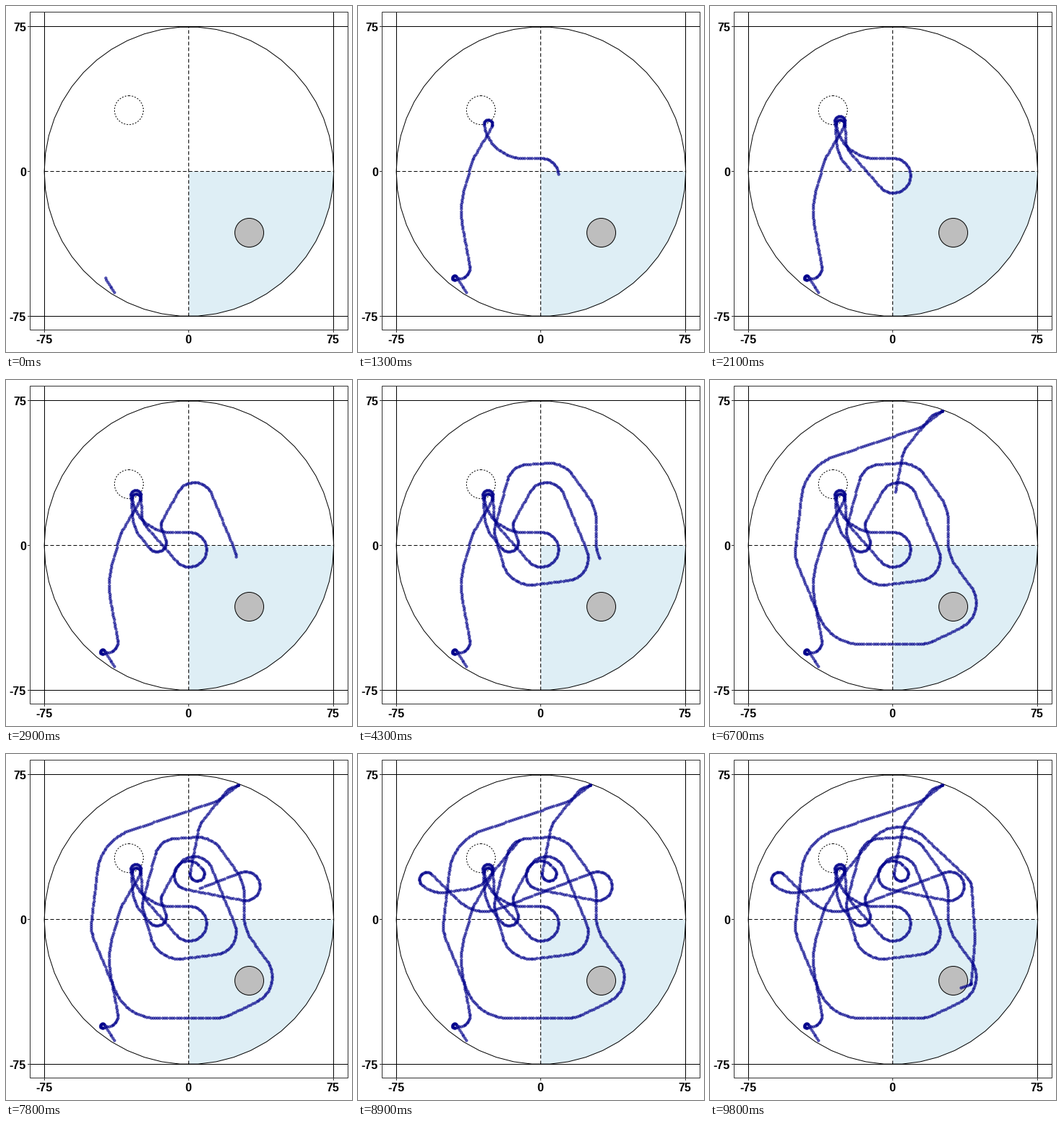
Recreate the animation shown at these times as a matplotlib script. Size 480 px wide and 480 px high, loop 10000 ms.

```python
import numpy as np
import matplotlib.pyplot as plt
from matplotlib.animation import FuncAnimation
from matplotlib.patches import Circle, Polygon, Rectangle

SIZE, DPI = 480, 100
FRAMES, INTERVAL = 100, 100
LAST = 98          # the finished track is held for one more frame
RATE = 12          # tracked positions per frame
LEAD = 8           # positions already drawn at the start
TURN_COST = 8      # a turn of one radian takes as long as this many pixels
PX = 72 / DPI      # one pixel in points
CX, CY, R = 253.4, 229.2, 200.8
INK, NAVY = "#333333", "#00008b"

plt.rcParams["font.family"] = "Liberation Sans"
fig = plt.figure(figsize=(SIZE / DPI, SIZE / DPI), dpi=DPI, facecolor="white")
ax = fig.add_axes([0, 0, 1, 1])
ax.set(xlim=(-.5, SIZE - .5), ylim=(SIZE - .5, -.5))  # whole numbers are pixel centres
ax.axis("off")


def line(x, y, color="black", dashed=False):
    ax.plot(x, y, color=color, lw=PX, snap=False, zorder=3,
            solid_capstyle="butt", dash_capstyle="butt",
            ls=(0, (5, 3)) if dashed else "-")


def disc(x, y, fill, style="-"):
    ax.add_patch(Circle((x, y), 20, fc=fill, ec="black", lw=PX, ls=style,
                        capstyle="butt", zorder=3))


def label(x, y, text, ha):
    ax.text(x, y, text, ha=ha, va="baseline", fontsize=16 * PX, weight="bold")


def arc(a, b, n):
    t = np.linspace(a, b, n)
    return np.column_stack([CX + R * np.cos(t), CY + R * np.sin(t)])


def draw_pool():
    quarter = np.vstack([[CX, CY], arc(0, np.pi / 2, 26)])
    ax.add_patch(Polygon(quarter, fc="#deeef5", ec="none", zorder=1))
    line(*arc(0, 2 * np.pi, 51).T)
    left, mid_x, right = (round(CX + k * R) for k in (-1, 0, 1))
    top, mid_y, bottom = (round(CY + k * R) for k in (-1, 0, 1))
    for x in (left, right):
        line([x, x], [8, 449])
    for y in (top, bottom):
        line([33, 474], [y, y])
    line([mid_x, mid_x], [bottom, top], dashed=True)
    line([left, right], [mid_y, mid_y], dashed=True)
    disc(170, 144, "none", (0, (2, 2)))
    disc(337, 314, "#bebebe")
    ax.add_patch(Rectangle((33, 8), 441, 441, fill=False, ec=INK, lw=PX,
                           snap=False, zorder=4))
    for value, x, y in ((-75, left, bottom), (0, mid_x, mid_y), (75, right, top)):
        line([x, x], [449.5, 452.5], INK)
        line([29.5, 32.5], [y, y], INK)
        label(x - 1, 467.5, str(value), "center")
        label(27.3, y + 6.5, str(value), "right")


# The swimmer rounds these circles one after another: x, y, radius
# (positive clockwise, negative anticlockwise, zero for a corner).
TURNS = [
    # release at the rim, up to the dotted ring
    (150, 397, 0), (134, 377, -3), (140, 363, -15), (263, 285, 120),
    (172, 218, 14), (180.5, 164, -6), (229, 156, -55),
    # back to the ring
    (254, 235, 24), (218, 185, 30), (180, 160, -7), (228, 185, -53), (209, 225, -13),
    # widening circles
    (233, 202, 18), (261, 168, 26), (288, 247, 31), (240, 243, 41), (218, 209, 29),
    (235, 146, 29), (265, 155, 40), (275, 195, 55), (385, 225, -55), (331, 309, 38),
    (290, 316, 50), (207, 306, 60), (170, 238, 52), (194, 170, 68),
    # touch the rim, small loops
    (270, 20, -50), (322, 43, 0), (320, 64, -19), (300, 112, -34), (265, 166, -10),
    (253, 168, -20), (332, 183, -20), (176, 165, 53), (95, 174, -10), (115, 157, -35),
    # round to the platform
    (150, 150, -37), (262, 151, 50), (338, 188, 25), (267, 255, 100),
    (359, 317, 3), (348, 324, 0),
]


def heading(a, b):
    """Direction of the line that leaves circle a and meets circle b."""
    d = complex(b[0] - a[0], b[1] - a[1])
    return np.angle(d) - np.arcsin((b[2] - a[2]) / abs(d))


def turn_angle(start, end, r):
    turn = (end - start + np.pi) % (2 * np.pi) - np.pi
    if turn * r < 0 and abs(turn) > .2:
        turn += 2 * np.pi * np.sign(r)
    return turn


def trace(turns):
    """Points along the arcs and their joining lines, with elapsed effort."""
    ways = [heading(a, b) for a, b in zip(turns, turns[1:])]
    points, effort = [], []
    spent = 0
    for (x, y, r), way, out in zip(turns, ways[:1] + ways, ways + ways[-1:]):
        turn = turn_angle(way, out, r)
        u = np.linspace(0, 1, 40)
        p = complex(x, y) - 1j * r * np.exp(1j * (way + turn * u))
        if points:
            spent += abs(p[0] - points[-1][-1])
        cost = abs(turn) * (abs(r) + TURN_COST)
        points.append(p)
        effort.append(spent + cost * u)
        spent += cost
    return np.concatenate(points), np.concatenate(effort)


def positions():
    p, effort = trace(TURNS)
    t = np.linspace(0, effort[-1], LAST * RATE + LEAD)
    xy = [np.interp(t, effort, c) for c in (p.real, p.imag)]
    return np.array(xy) - .5  # markers snap upwards by half a pixel


draw_pool()
path = positions()
dots, = ax.plot([], [], "o", color=NAVY, ms=3.4 * PX, mew=PX, alpha=.6, zorder=5)


def update(frame):
    dots.set_data(*path[:, :min(frame, LAST) * RATE + LEAD])
    return dots,


anim = FuncAnimation(fig, update, frames=FRAMES, interval=INTERVAL,
                     repeat=True, repeat_delay=0, blit=False)
plt.show()
```
